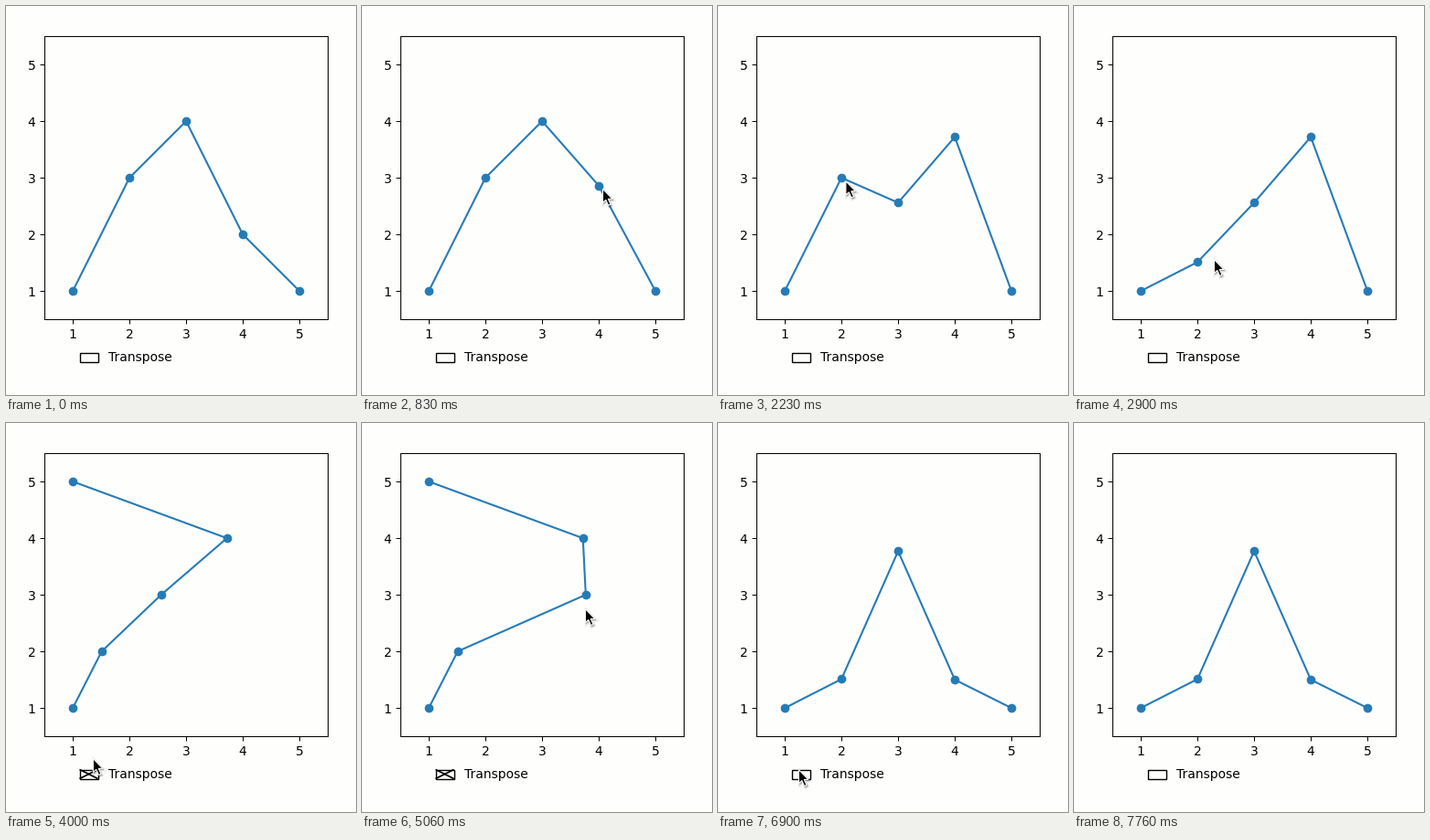
A matplotlib script for the animation above (9.16 s loop, 383 by 426 pixels).

```python
import numpy as np
import matplotlib.pyplot as plt
from matplotlib.animation import FuncAnimation
from matplotlib.patches import Polygon, Rectangle

W, H, DPI = 383, 426, 100
LOOP, STEP = 9160, 20
LEFT, BOTTOM, SIDE = 42.1, 343.1, 310
UNIT = SIDE / 5
PAPER, BLUE = "#fefefd", "#267bb6"

ORDER = np.arange(1, 6)
START = [1, 3, 4, 2, 1]
ENTRY = (378, 265)
SHOW, HIDE = 130, 7760
CHECK_ON, CHECK_OFF = 3500, 6900

moves, pulls = [], []


def ease(t, t0, t1):
    """Minimum-jerk progress, like a hand on a mouse."""
    u = np.clip((t - t0) / (t1 - t0), 0, 1)
    return u**3 * (10 - 15 * u + 6 * u * u)


def transposed(t):
    return CHECK_ON <= t < CHECK_OFF


def values(t):
    vals = np.array(START, float)
    for t0, t1, i, goal in pulls:
        vals[i] += (goal - vals[i]) * ease(t, t0, t1)
    return vals


def points(t):
    vals = values(t)
    return (vals, ORDER) if transposed(t) else (ORDER, vals)


def pointer(t):
    tip = np.array(ENTRY, float)
    for t0, t1, x, y in moves:
        tip += (np.array([x, y]) - tip) * ease(t, t0, t1)
    return tip


def move(t0, t1, x, y):
    moves.append((t0, t1, x, y))


def reach(t0, t1, i):
    """Bring the pointer to point i, slightly off its centre."""
    xs, ys = points(t1)
    dx, dy = (0, 5) if transposed(t1) else (5, 4)
    move(t0, t1, LEFT + (xs[i] - 0.5) * UNIT + dx,
         BOTTOM - (ys[i] - 0.5) * UNIT + dy)


def pull(t0, t1, i, goal):
    """Drag point i to a new value, pointer attached."""
    pulls.append((t0, t1, i, goal))
    reach(t0, t1, i)


reach(0, 480, 3)
pull(560, 1080, 3, 3.72)
reach(1080, 1400, 2)
pull(1580, 2020, 2, 2.56)
reach(2020, 2240, 1)
pull(2270, 2660, 1, 1.51)
move(2890, 2900, 154, 278)
move(2940, 3300, 90, 382)
reach(3870, 4460, 2)
pull(4610, 4620, 2, 3.4)
pull(4780, 4980, 2, 3.77)
move(4980, 5060, 245, 204)
reach(5120, 5340, 3)
pull(5380, 5900, 3, 1.5)
move(6380, 6660, 89, 380)
move(7240, 8000, 404, 406)

plt.rcParams.update({"axes.linewidth": 0.72, "xtick.major.width": 0.72,
                     "ytick.major.width": 0.72})
fig = plt.figure(figsize=(W / DPI, H / DPI), dpi=DPI, facecolor=PAPER)
ax = fig.add_axes([LEFT / W, 1 - BOTTOM / H, SIDE / W, SIDE / H],
                  facecolor=PAPER)
ax.set(xlim=(0.5, 5.5), ylim=(0.5, 5.5), xticks=ORDER, yticks=ORDER)
line, = ax.plot([], [], "o-", color=BLUE)

# full-stage layer in pixels, y pointing down
top = fig.add_axes([0, 0, 1, 1], zorder=5)
top.set(xlim=(0, W), ylim=(H, 0))
top.axis("off")
x0, y0, bw, bh = 80.5, 379.5, 20, 10
top.add_patch(Rectangle((x0, y0), bw, bh, fc=PAPER, ec="k", lw=1))
top.text(112, 384.5, "Transpose", ha="left", va="center")
cross = [top.plot([x0, x0 + bw], ys, color="k", lw=1.25,
                  solid_capstyle="butt")[0]
         for ys in ([y0, y0 + bh], [y0 + bh, y0])]

SHAPE = 1.05 * np.array([(0, 0), (0, 14.2), (3.2, 11.3), (5.8, 17),
                         (8.2, 15.9), (5.6, 10.3), (10, 10.2)]) - (0.6, 0.3)
shadow = [Polygon(SHAPE, fc="k", ec="k", lw=w, alpha=0.08)
          for w in (0.4, 1.4, 2.4)]
arrow = Polygon(SHAPE, fc="k", ec="w", lw=0.8)
for patch in (*shadow, arrow):
    patch.set_zorder(9)
    top.add_patch(patch)


def draw(frame):
    t = frame * STEP
    line.set_data(*points(t))
    for c in cross:
        c.set_visible(transposed(t))
    tip = pointer(t)
    for patch in (*shadow, arrow):
        drop = (0, 0) if patch is arrow else (1, 1.5)
        patch.set_xy(SHAPE + tip + drop)
        patch.set_visible(SHOW <= t < HIDE)
    return line, *cross, *shadow, arrow


anim = FuncAnimation(fig, draw, frames=LOOP // STEP, interval=STEP,
                     repeat=True, repeat_delay=0, blit=False)
plt.show()
```
